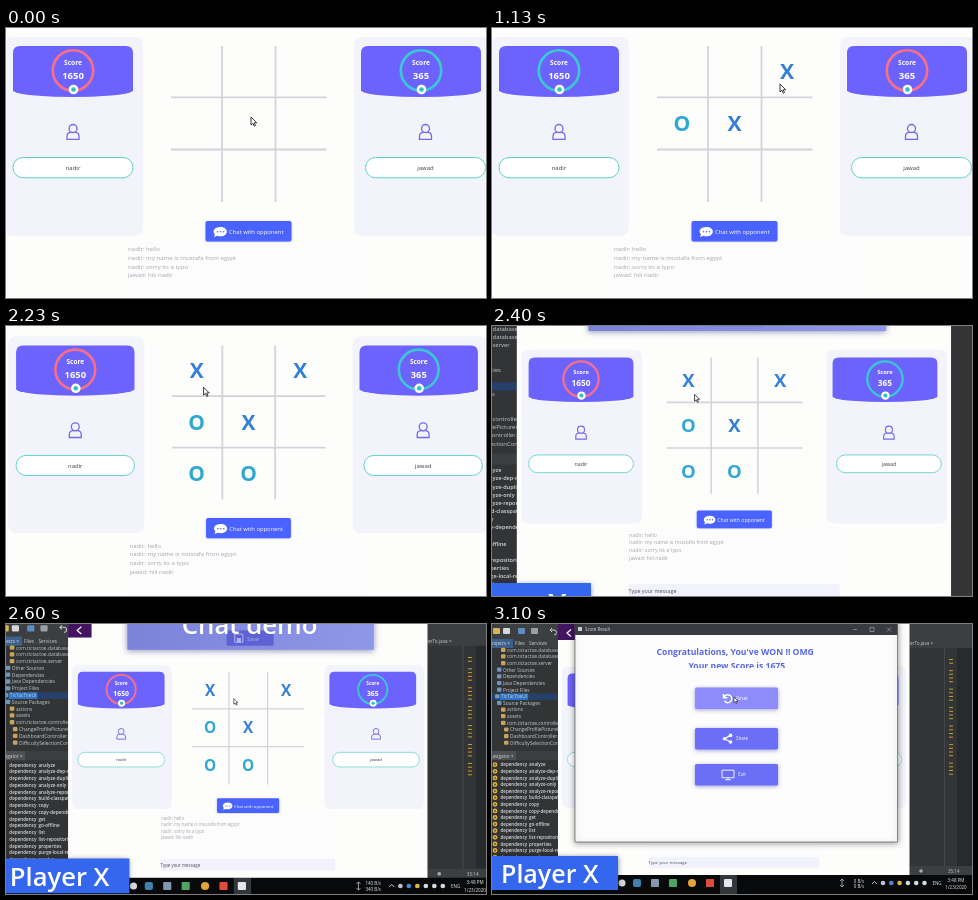
An HTML page with a canvas for the animation above (3200 ms loop, 480 px wide and 270 px high).

```html
<!DOCTYPE html>
<html lang="en">
<head>
<meta charset="utf-8">
<title>Tic-tac-toe</title>
<style>
html, body { margin: 0; height: 100%; overflow: hidden; background: #fdfdfc; }
canvas { display: block; width: 100vw; height: 100vh; }
</style>
</head>
<body>
<canvas id="stage" width="480" height="270"></canvas>
<script>
const ctx = document.getElementById('stage').getContext('2d');
const LOOP = 3200, ZOOM = 0.707, OFFSET_X = 70.6, OFFSET_Y = 36.7;
const PURPLE = '#6c63ff', TEAL = '#3cc8cf', RED = '#fb6f84';

// [time, column, row, mark]
const moves = [
  [30, 1, 1, 'X'], [460, 0, 1, 'O'], [1060, 2, 0, 'X'], [1270, 0, 2, 'O'],
  [1830, 0, 0, 'X'], [2030, 1, 2, 'O'], [2690, 1, 0, 'X']
];
// [time, x, y]
const cursorPath = [
  [0, 245, 89], [30, 245, 89], [110, 248, 113], [200, 248, 102], [460, 248, 102],
  [630, 314, 40], [760, 322, 13], [930, 297, 46], [1080, 297, 46], [1330, 189, 166],
  [1630, 189, 166], [1830, 197, 61], [2510, 197, 60], [2680, 242.4, 51.3]
];

const clamp = v => Math.max(0, Math.min(1, v));
const easeInOut = t => t < 0.5 ? 2 * t * t : 1 - 2 * (1 - t) ** 2;

function rect(x, y, w, h, fill, r = 0, stroke, line = 1) {
  ctx.beginPath();
  ctx.roundRect(x, y, w, h, r);
  if (fill) { ctx.fillStyle = fill; ctx.fill(); }
  if (stroke) { ctx.strokeStyle = stroke; ctx.lineWidth = line; ctx.stroke(); }
}
function circle(x, y, r, fill, stroke, line = 1) {
  rect(x - r, y - r, 2 * r, 2 * r, fill, r, stroke, line);
}
function path(d, stroke, line = 1, fill) {
  const p = new Path2D(d);
  if (fill) { ctx.fillStyle = fill; ctx.fill(p); }
  if (stroke) { ctx.strokeStyle = stroke; ctx.lineWidth = line; ctx.stroke(p); }
}
function text(str, x, y, size, color, align = 'left', weight = 400) {
  ctx.font = `${weight} ${size}px "Open Sans", "Noto Sans", sans-serif`;
  ctx.textAlign = align;
  ctx.fillStyle = color;
  ctx.fillText(str, x, y);
}
function withShadow(blur, color, draw) {
  ctx.save();
  ctx.shadowBlur = blur;
  ctx.shadowColor = color;
  ctx.shadowOffsetY = 1;
  draw();
  ctx.restore();
}

function drawIde() {
  rect(-60, -40, 620, 330, '#323436');
  rect(0, 0, 480, 24, '#3c3f41');
  rect(0, 15, 21, 9, '#3d5f8c');
  ['#d9b45a', '#d5d8da', '#5d8fc4', '#9aa0a6'].forEach((c, i) => rect([1, 11, 26, 39][i], 4, 7, 6, c, 1));
  path('M58 6h4a2.5 2.5 0 0 1 0 5M60 4l-2 2 2 2', '#c4c8cc', 1);
  text('Projects ×', -3, 21, 4.6, '#e2e4e6');
  text('Files', 23, 21, 4.8, '#d0d3d6');
  text('Services', 37, 21, 4.8, '#d0d3d6');

  rect(-20, 69.5, 86, 6.6, '#25416b');
  rect(8, 69.5, 28, 6.6, '#2f74c4');
  const tree = ['com.tictactoe.database.g', 'com.tictactoe.database.p', 'com.tictactoe.server',
    'Other Sources', 'Dependencies', 'Java Dependencies', 'Project Files', 'TicTacToeUI',
    'Source Packages', 'actions', 'assets', 'com.tictactoe.controllers',
    'ChangeProfilePictureCon', 'DashboardController.java', 'DifficultySelectionContr'];
  tree.forEach((name, i) => {
    const y = 27.7 + i * 6.64;
    const x = i < 3 || (i > 8 && i < 12) ? 15 : i > 11 ? 18 : i === 7 ? 9 : 11;
    rect(x - 6, y - 4, 4.5, 4.2, i > 2 && i < 9 ? '#7296b8' : '#c6a45c', 1);
    text(name, x, y, 4.8, '#c8ccd0');
  });

  rect(0, 127, 66, 9, '#3c3f41');
  rect(0, 127, 24, 9, '#4c5053');
  text('Navigator ×', -3, 133.5, 4.6, '#d8dade');
  ['analyze', 'analyze-dep-mgt', 'analyze-duplicate', 'analyze-only', 'analyze-report',
    'build-classpath', 'copy', 'copy-dependencies', 'get', 'go-offline', 'list',
    'list-repositories', 'properties', 'purge-local-repo', 'resolve'].forEach((goal, i) => {
    const y = 142.3 + i * 6.6;
    circle(3, y - 1.6, 2.4, '#e2b33c');
    circle(3, y - 1.6, 0.9, '#4a4334');
    text('dependency', 8.5, y, 4.5, '#d5d8db', 'left', 600);
    text(goal, 37, y, 4.5, '#d5d8db', 'left', 600);
  });

  text('erTo.java ×', 418, 21, 4.6, '#c8cbd0');
  rect(452, 24, 1, 219, '#44474a');
  rect(465, 24, 15, 219, '#282b2e');
  for (let i = 0; i < 32; i++) {
    const y = 35 + i * 3.7;
    if ((i * 7) % 5 < 4) rect(457, y, 4, 1 + (i * 3) % 3 * 0.5, '#c79b2e');
  }
  rect(417, 242, 63, 9, '#3c3f41');
  circle(429, 247, 1.8, '#a7abb0');
  text('35:14', 456, 249, 4.5, '#c8cbd0');
}

function drawTaskbar(t) {
  rect(-60, 251, 600, 40, '#08090b');
  rect(228, 251, 17, 19, '#33373c');
  circle(117, 259, 4, '#39465e');
  circle(130, 259, 3.5, '#d6d9db');
  rect(141, 255, 8, 8, '#3e82ad', 2);
  rect(159, 255, 8, 8, '#8297ad', 1);
  rect(177, 255, 8, 8, '#4da665', 1);
  circle(200, 259, 4, '#e5a43a');
  rect(214, 255, 8, 8, '#e14a3c', 1);
  rect(232, 255, 8, 8, '#e5e7ea', 1);
  path('M350 255v8M348 257l2-2 2 2M348 261l2 2 2-2', '#b9bdc0', 0.8);
  const rates = t < 2690 ? ['140 B/s', '340 B/s'] : t < 3090 ? ['108 B/s', '740 B/s'] : ['0 B/s', '0 B/s'];
  rates.forEach((rate, i) => text(rate, 372, 258.5 + i * 5.7, 4.4, '#eceef0', 'right'));
  path('M380 260l2.5-2.5 2.5 2.5', '#d8dadd', 0.9);
  ['#bfc3c8', '#4b86d5', '#d8bd48', '#d6d9dc', '#d6d9dc', '#d6d9dc'].forEach((c, i) =>
    circle(391 + i * 8.3, 259, 2.3, c));
  text('ENG', 445, 261, 4.5, '#f0f0f0', 'center');
  text('3:48 PM', 464, 257.5, 4.5, '#f0f0f0', 'center');
  text('1/23/2020', 464, 264.5, 4.5, '#f0f0f0', 'center');
}

function drawCard(cardX, headX, ringX, pillX, score, name, ringColor) {
  const mid = pillX + 60;
  rect(cardX, 9, 138, 199, '#f3f3fc', 8);
  path(`M${headX} 25q0-7 7-7h106q7 0 7 7v38q-5 3-22 4.5q-38 3-76 0q-17-1.5-22-4.5z`, null, 0, PURPLE);
  circle(ringX, 42.5, 20.2, null, ringColor, 2.6);
  text('Score', ringX, 37, 6.6, '#fff', 'center', 700);
  text(score, ringX, 51, 9.5, '#fff', 'center', 700);
  circle(ringX + 0.5, 61.5, 4.8, '#fff');
  circle(ringX + 0.5, 61.5, 2.3, '#2fbfc6');
  path(`M${mid - 6} 111.3v-3q0-4 4-4h4q4 0 4 4v3z`, '#7468ec', 1.3);
  circle(mid, 100.5, 4, '#f3f3fc', '#7468ec', 1.3);
  rect(pillX, 129.5, 120, 20.3, '#fff', 10, '#62d0cf', 1);
  text(name, mid, 142, 6, '#3c3c48', 'center');
}

function drawGame(t) {
  const played = moves.filter(m => t >= m[0]);
  const leftTurn = played.length % 2 === 0;
  drawCard(-1, 7, 67, 7, '1650', 'nadir', leftTurn ? RED : TEAL);
  drawCard(348, 355, 415, 359.5, '365', 'jawad', leftTurn ? TEAL : RED);

  if (t >= 2660) rect(217, 18, 52, 50, '#f1f1f8');
  path('M216 18V174M269.5 18V174M165 69.3H320.5M165 121.5H320.5', '#d2d4dc', 1.8);
  for (const [, col, row, mark] of played) {
    text(mark, 190 + col * 52.5, 51.2 + row * 52.2, 21.2, mark === 'X' ? '#3380d6' : '#31a8d3', 'center', 700);
  }

  withShadow(3, 'rgba(70,80,200,.3)', () => rect(199.5, 193, 86, 20.5, '#4a62ff', 2));
  path('M214.5 199c8.5 0 8.5 9.3 0 9.3q-2 0-3-.5l-3.5 1.2 1-2.5c-3-3-1-7.5 5.5-7.5z', null, 0, '#fff');
  [211.5, 214.5, 217.5].forEach(x => circle(x, 203.7, 0.8, '#4a62ff'));
  text('Chat with opponent', 223, 206, 5.9, '#fff');

  rect(122, 214.5, 241, 62, '#fcfcfd');
  ['nadir: hello', 'nadir: my name is mustafa from egypt', 'nadir: sorry its a typo', 'jawad: hiii nadir']
    .forEach((line, i) => text(line, 122, 223 + i * 8.8, 6.1, '#a5a6af'));
  rect(122, 277.5, 241, 15.5, '#f1f2fb');
  text('Type your message', 121.5, 288, 6.1, '#4c4c57');
}

function drawOverlays() {
  rect(66, 0, 23, 16, '#43145f');
  path('M79 5.5l-4 3.5 4 3.5', '#fff', 1.2);
  const fill = ctx.createLinearGradient(124, 0, 365, 28);
  fill.addColorStop(0, '#7a83d8');
  fill.addColorStop(1, '#8f97ea');
  withShadow(6, 'rgba(40,50,120,.5)', () => rect(124, -30, 241, 58, fill));
  rect(221, 9, 46, 15, 'rgba(72,76,204,.65)', 1.5);
  rect(229, 12.5, 8, 8, null, 1, 'rgba(220,222,255,.65)', 1);
  rect(231, 16.5, 4, 4, 'rgba(220,222,255,.65)');
  text('Save', 241, 19, 5.5, 'rgba(225,226,255,.65)');
  text('Chat demo', 243.5, 13, 25.2, '#fff', 'center', 600);
}

function drawButton(y, label, fill, drawIcon) {
  withShadow(4, 'rgba(70,70,180,.5)', () => rect(203, y, 83, 21.5, fill, 1.5));
  ctx.save();
  ctx.translate(235.5, y + 10.7);
  drawIcon();
  ctx.restore();
  text(label, 250, y + 12.3, 4.5, '#fff', 'center');
}

function drawShareIcon() {
  path('M3-3.3L-3 0L3 3.3', '#fff', 1.2);
  [[3, -3.3], [-3, 0], [3, 3.3]].forEach(([x, y]) => circle(x, y, 1.8, '#fff'));
}

function drawResult(t) {
  const open = clamp((t - 2730) / 130);
  if (!open) return;
  const scale = 0.92 + 0.08 * (1 - (1 - open) ** 2);
  ctx.save();
  ctx.globalAlpha = open;
  ctx.translate(244, 109);
  ctx.scale(scale, scale);
  ctx.translate(-244, -109);
  withShadow(6, 'rgba(0,0,0,.4)', () => rect(83, -2, 322.5, 220, '#fdfdfd', 0, '#5a5c61', 0.7));
  rect(83, -2, 322.5, 13, '#383b3f');
  rect(86, 3, 4, 4, '#c9ccd1', 0.5);
  text('Score Result', 93, 7, 4.4, '#e0e2e5');
  path('M361 5.5h4M378 3.5h4v4h-4zM395 3.5l4 4M399 3.5l-4 4', '#c8cacd', 0.5);

  ctx.save();
  ctx.beginPath();
  ctx.rect(83, 11, 322, 33);
  ctx.clip();
  text("Congratulations, You've WON !! OMG", 243.2, 31.2, 8.65, '#5867e6', 'center', 700);
  text('Your new Score is 1675', 244.8, 45.2, 8.65, '#5867e6', 'center', 700);
  ctx.restore();

  drawButton(63.5, 'Reset', t >= 2920 ? '#8d8cfa' : '#6b6ff8', () =>
    path('M-4-4.2v3.8h3.8M-3.4-1a4 4 0 1 1 .4 3.700', '#fff', 1.5));
  drawButton(104, 'Share', '#6b6ff8', drawShareIcon);
  drawButton(140, 'Exit', '#6b6ff8', () => path('M-5.5-4.5h12v7.500h-12zM.5 3v2M-2.500 5h6', '#fff', 0.9));
  ctx.restore();
}

function drawCursor(t) {
  const next = cursorPath.findIndex(k => k[0] > t);
  const b = next < 0 ? cursorPath.at(-1) : cursorPath[next];
  const a = next < 0 ? b : cursorPath[next - 1];
  const f = next < 0 ? 0 : easeInOut((t - a[0]) / (b[0] - a[0]));
  ctx.save();
  ctx.translate(a[1] + (b[1] - a[1]) * f, a[2] + (b[2] - a[2]) * f);
  path('M0 0V8L1.9 6.3L3.2 9.2L4.5 8.6L3.2 5.8H5.7Z', '#22222a', 0.9, '#fff');
  ctx.restore();
}

function draw(t) {
  const pull = easeInOut(clamp((t - 2150) / 540));
  const gameScale = 1 - (1 - ZOOM) * pull;
  const gameView = () => ctx.setTransform(gameScale, 0, 0, gameScale, OFFSET_X * pull, OFFSET_Y * pull);
  const deskView = () => {
    gameView();
    ctx.scale(1 / ZOOM, 1 / ZOOM);
    ctx.translate(-OFFSET_X, -OFFSET_Y);
  };

  deskView();
  drawIde();
  drawTaskbar(t);
  rect(66, -10, 351.5, 261, '#fdfdfc');
  gameView();
  drawGame(t);
  deskView();
  drawOverlays();
  drawResult(t);
  withShadow(5, 'rgba(0,0,0,.5)', () => rect(-20, 232, 146, 34, '#3467ee'));
  text('Player X', 9, 259, 25, '#fff', 'left', 600);
  gameView();
  drawCursor(t);
}

function tick() {
  draw(performance.now() % LOOP);
  requestAnimationFrame(tick);
}
tick();
</script>
</body>
</html>
```
